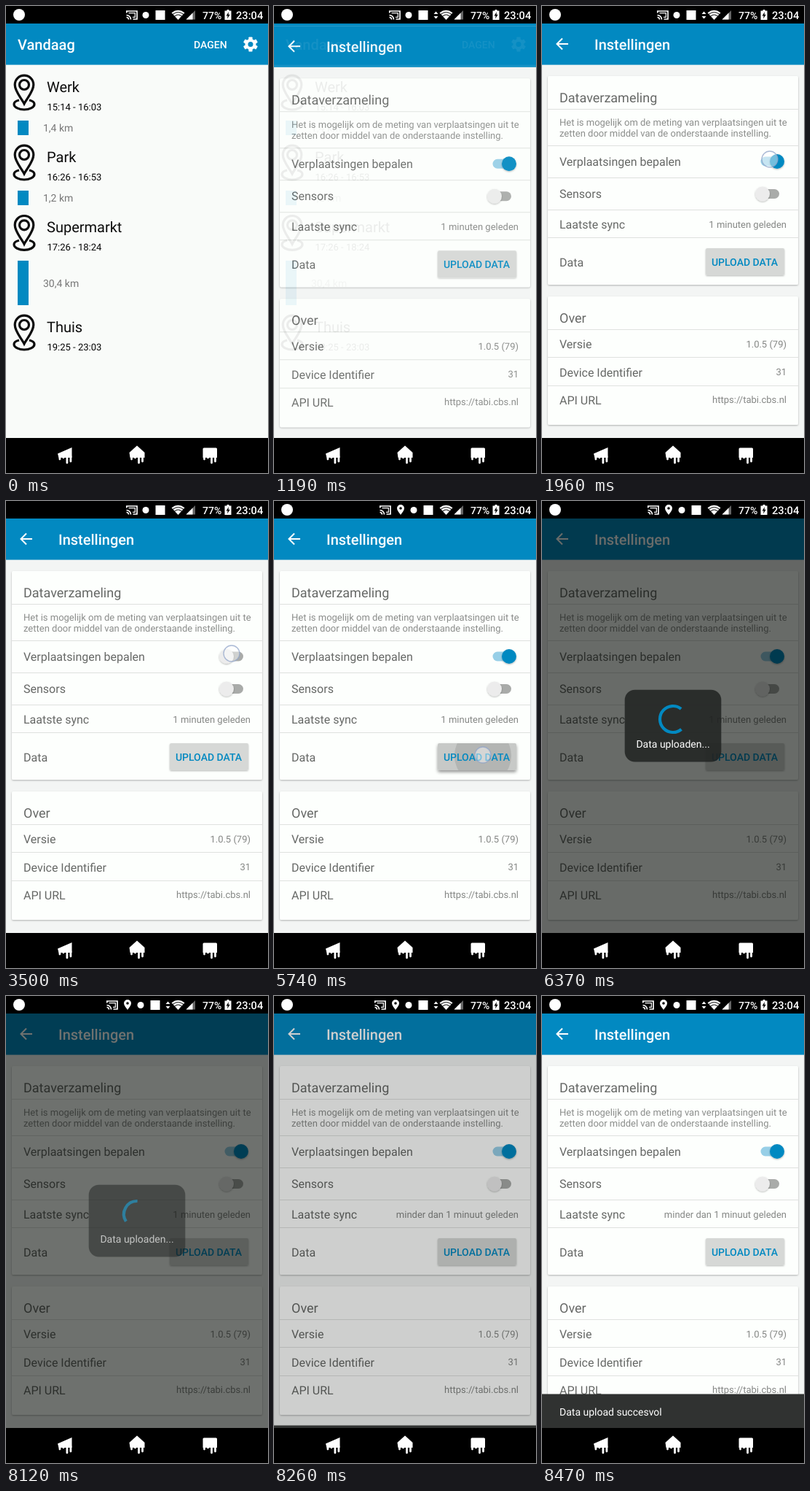
These frames come from a looping animation (360x640 px, 8540 ms). An HTML page:

```html
<!DOCTYPE html>
<html lang="nl">
<head>
<meta charset="utf-8">
<title>Vandaag</title>
<style>
html, body { margin: 0; width: 100%; height: 100%; overflow: hidden; background: #000; }
svg { display: block; width: 360px; height: 640px; font-family: Roboto, "Open Sans", sans-serif; text-rendering: geometricPrecision; }
.medium { font-weight: 500; }
</style>
</head>
<body>
<svg id="stage" viewBox="0 0 360 640" xmlns="http://www.w3.org/2000/svg"></svg>
<script>
const BLUE = '#0289c1';
const LOOP = 8540, STEP = 70;
const stage = document.getElementById('stage');

const text = (x, y, size, fill, str, extra = '') =>
  `<text x="${x}" y="${y}" font-size="${size}" fill="${fill}" ${extra}>${str}</text>`;
const rect = (x, y, w, h, fill, extra = '') =>
  `<rect x="${x}" y="${y}" width="${w}" height="${h}" fill="${fill}" ${extra}/>`;
const circle = (x, y, r, fill, extra = '') =>
  `<circle cx="${x}" cy="${y}" r="${r}" fill="${fill}" ${extra}/>`;
const MEDIUM = 'class="medium"', END = 'text-anchor="end"', MID = 'text-anchor="middle"';

// Overview page
const place = (y, name, hours) => `
  <g transform="translate(25 ${y})">
    <g fill="none" stroke="#0b0b0b" stroke-width="3.2">
      <path d="M-7 36C-11.500 37-14 39-14 41.500C-14 46-7 49-0 49S14 46 14 41.500C14 39 11.500 37 7 36"/>
      <path d="M0 41C-4 33-12.800 24-12.800 15A12.800 12.800 0 0 1 12.800 15C12.800 24 4 33 0 41Z"/>
      <circle cy="15" r="6.500"/>
    </g>
  </g>
  ${text(56, y + 24.7, 20, '#0c0c0c', name)}${text(56.5, y + 50, 13, '#050505', hours)}`;
const trip = (y, h, dist) =>
  rect(16, y, 15, h, BLUE) + text(51, y + h / 2 + 5, 14, '#777', dist);
const header = rect(0, 24, 360, 56.6, BLUE);

const gear = `<g transform="translate(336 52.500)" fill="#fff">
  ${[0, 60, 120].map(a => rect(-2.6, -10, 5.2, 20, '#fff', `rx=".8" transform="rotate(${a})"`)).join('')}
  ${circle(0, 0, 7.5, '#fff')}${circle(0, 0, 3.5, BLUE)}</g>`;

const overview = rect(0, 24, 360, 568, '#f9fbf9') + header
  + text(16, 60, 20, '#fff', 'Vandaag', MEDIUM)
  + text(258, 58, 14, '#fff', 'DAGEN', MEDIUM)
  + '<circle id="gearRipple" cx="336" cy="53" fill="#fff"/>' + gear
  + place(93, 'Werk', '15:14 - 16:03') + trip(157, 20, '1,4 km')
  + place(189, 'Park', '16:26 - 16:53') + trip(253, 20, '1,2 km')
  + place(285.3, 'Supermarkt', '17:26 - 18:24') + trip(349, 61, '30,4 km')
  + place(422, 'Thuis', '19:25 - 23:03');

// Settings page
const card = (y, h, lines) =>
  rect(8, y, 344, h, '#fdfffd', 'rx="2" filter="url(#cardShadow)"')
  + lines.map(v => rect(8, v, 344, 1, '#dfe1df')).join('');
const label = (y, str, size = 16) => text(24, y, size, '#666866', str);
const value = (y, str, id = '') => text(336, y, 13, '#858785', str, `${END} ${id}`);
const toggle = (y, id) => `
  <rect id="${id}Track" x="300.500" y="${y - 6.5}" width="25.500" height="13" rx="6.500" fill="#a9aba9"/>
  <circle id="${id}Ripple" cx="303" cy="${y}" r="20" fill="#000" opacity="0"/>
  <circle id="${id}Thumb" cx="303" cy="${y}" r="10" fill="#ececec" filter="url(#thumbShadow)"/>`;

const settings = rect(0, 24, 360, 568, '#f3f5f4') + header
  + '<path d="M36 52H21M28 44.500L20.500 52L28 59.500" fill="none" stroke="#fff" stroke-width="2"/>'
  + text(72, 60, 20, '#fff', 'Instellingen', MEDIUM)
  + card(96, 286, [141, 191, 235, 279, 317])
  + label(132, 'Dataverzameling', 18)
  + text(24, 164, 13, '#8b8d8b', 'Het is mogelijk om de meting van verplaatsingen uit te')
  + text(24, 178.5, 13, '#8b8d8b', 'zetten door middel van de onderstaande instelling.')
  + label(219, 'Verplaatsingen bepalen') + toggle(213, 'move')
  + label(263, 'Sensors') + toggle(257.5, 'sensor')
  + label(305, 'Laatste sync') + value(303.5, '', 'id="sync"')
  + label(357, 'Data')
  + rect(225, 332, 108, 37, '#d6d8d6', 'id="button" rx="2" filter="url(#cardShadow)"')
  + '<g clip-path="url(#buttonClip)"><rect id="buttonTint" x="225" y="332" width="108" height="37"/>'
  + '<circle id="buttonRipple" cx="287" cy="349"/></g>'
  + text(278.5, 356, 14, BLUE, 'UPLOAD DATA', `${MEDIUM} ${MID}`)
  + card(398, 176, [443, 481, 520])
  + label(434, 'Over', 18)
  + label(469, 'Versie') + value(467.5, '1.0.5 (79)')
  + label(507.5, 'Device Identifier') + value(506, '31')
  + label(546, 'API URL') + value(544, 'https://tabi.cbs.nl');

// System bars
const status = rect(0, 0, 360, 24, '#000')
  + circle(18, 12, 8, '#fff', 'id="notice"')
  + `<g id="cast" fill="none" stroke="#fff" stroke-width="1.700">
      <path d="M165.800 9.500V7H180V18H174.500M165.500 12.500A6 6 0 0 1 171.500 18.500M165.500 15.500A3 3 0 0 1 168.500 18.500"/>
      <path d="M168.500 9.700H177.300V15.300H174" stroke-width="1.200"/></g>`
  + `<path id="pin" fill="#fff" fill-rule="evenodd" d="M174 19C172 16 169 13 169 10A5 5 0 0 1 179 10C179 13 176 16 174 19ZM174 8.200A1.800 1.800 0 1 0 174 11.800A1.800 1.800 0 1 0 174 8.200Z"/>`
  + `<g id="radios">${circle(192, 12.5, 4.5, '#fff')}${rect(205.5, 6, 13, 13, '#fff')}</g>`
  + '<path id="arrows" fill="#fff" d="M219.500 11L222.500 7.500L225.500 11ZM219.500 14L222.500 17.500L225.500 14Z"/>'
  + '<path fill="#fff" d="M236.500 19L227.500 9.200Q236.500 2.500 245.500 9.200Z"/>'
  + '<path fill="none" stroke="#000" stroke-width="1" d="M229 11.500Q236.500 5.500 244 11.500M231.500 14Q236.500 10 241.500 14"/>'
  + '<path fill="#666" d="M247.500 18.500H260V6Z"/><path fill="#fff" d="M247.500 18.500H256.500V9.500Z"/>'
  + text(270, 18, 14, '#fff', '77%', MEDIUM)
  + '<path fill="#fff" d="M303.500 5H306.500V6.500H309.500V19H300.500V6.500H303.500Z"/>'
  + '<path d="M306 8L302.500 13.500H304.700L304 17.500L307.800 11.800H305.500Z"/>'
  + text(316, 18, 14.7, '#fff', '23:04', MEDIUM);

// Each navigation key is a flat body with four drips below it
const drips = x => [3, 1, 8, 6].map((len, i) =>
  `<path d="M${x + i * 5} 617v${len + 1}" stroke="#fff" stroke-width="2.800" stroke-linecap="round"/>`).join('');
const navBar = rect(0, 592, 360, 48, '#000') + `<g fill="#fff">
  <path d="M71 613.500L90.500 605V619H72.500Z"/>${drips(73.9)}
  <path d="M169.500 612L180 602.500L190.500 612V619H170.500Z"/>${drips(172.5)}
  <path d="M270.500 607Q270.500 605.500 272 605.500H288.500Q290 605.500 290 607V619H270.500Z"/>${drips(272.5)}</g>`;

stage.innerHTML = `<defs>
  <filter id="cardShadow" x="-10%" y="-20%" width="120%" height="150%">
    <feDropShadow dx="0" dy="1" stdDeviation="1" flood-opacity=".28"/></filter>
  <filter id="raised" x="-10%" y="-20%" width="120%" height="160%">
    <feDropShadow dx="0" dy="2.500" stdDeviation="2" flood-opacity=".42"/></filter>
  <filter id="thumbShadow" x="-30%" y="-30%" width="160%" height="160%">
    <feDropShadow dx="0" dy="1" stdDeviation=".9" flood-opacity=".3"/></filter>
  <clipPath id="content"><rect y="24" width="360" height="568"/></clipPath>
  <clipPath id="buttonClip"><rect x="225" y="332" width="108" height="37" rx="2"/></clipPath>
</defs>
${rect(0, 0, 360, 640, '#000')}
<g clip-path="url(#content)">
  ${overview}
  <g id="settings">${settings}</g>
  ${rect(0, 24, 360, 568, '#000500', 'id="dim"')}
  <g id="dialog">${rect(113.7, 258.7, 132.6, 98.8, '#222423', 'rx="14" opacity=".87"')}
    <path id="spinner" fill="none" stroke="${BLUE}" stroke-width="4.200"/>
    ${text(180, 338, 14, '#fff', 'Data uploaden...', MID)}</g>
  <g id="snackbar">${rect(0, 545.5, 360, 47, '#303231')}${text(24, 575, 14, '#fff', 'Data upload succesvol')}</g>
</g>
${status}${navBar}
<circle id="touch" r="11" fill="#fff" fill-opacity=".45" stroke="#8fa3c8" stroke-opacity=".75" stroke-width="1.300"/>`;

const el = {};
stage.querySelectorAll('[id]').forEach(node => el[node.id] = node);
const set = (id, attrs) => {
  for (const key in attrs) el[id].setAttribute(key, attrs[key]);
};
const show = (id, on) => set(id, { visibility: on ? 'visible' : 'hidden' });
const shift = (id, x, y = 0) => set(id, { transform: `translate(${x} ${y})` });

const ramp = (t, from, to) => Math.min(1, Math.max(0, (t - from) / (to - from)));
const within = (t, from, to) => t >= from && t < to;

// Solves cubic-bezier(.4, 0, .2, 1)
function ease(x) {
  let lo = 0, hi = 1, u = .5;
  for (let i = 0; i < 20; i++) {
    u = (lo + hi) / 2;
    const bx = 1.2 * u * (1 - u) ** 2 + .6 * u * u * (1 - u) + u ** 3;
    if (bx < x) lo = u; else hi = u;
  }
  return u * u * (3 - 2 * u);
}

const touches = [
  { from: 700, to: 900, x: 336, y: 53 },
  { from: 1870, to: 2020, x: 313, y: 210 },
  { from: 3430, to: 3650, x: 310, y: 209 },
  { from: 5390, to: 5800, x: 287, y: 348 }
];
const pulse = (t, from, full, hold, end) => ramp(t, from, full) * (1 - ramp(t, hold, end));

const DIALOG_START = 5877;
function spinnerPath(time) {
  const cycle = 1333, radius = 18, phase = time % cycle / cycle;
  const base = 27 + time / 4444 * 720 + phase * 90;
  const tail = base + 270 * ease(ramp(phase, .5, 1));
  const head = Math.max(base + 270 * ease(ramp(phase, 0, .5)), tail + 2);
  const point = deg => {
    const a = (deg - 90) * Math.PI / 180;
    return `${180 + radius * Math.cos(a)} ${299 + radius * Math.sin(a)}`;
  };
  return `M${point(tail)}A${radius} ${radius} 0 ${head - tail > 180 ? 1 : 0} 1 ${point(head)}`;
}

function mix(a, b, k) {
  return `rgb(${a.map((v, i) => Math.round(v + (b[i] - v) * k))})`;
}

function render(t) {
  const touch = touches.find(p => within(t, p.from, p.to));
  show('touch', touch);
  if (touch) set('touch', { cx: touch.x, cy: touch.y });

  // Status bar
  const arrows = within(t, 500, 3000) || t >= 6800;
  const pin = t >= 4480;
  const left = arrows ? -7 : 0;
  show('arrows', arrows);
  show('pin', pin);
  shift('pin', left);
  shift('radios', left);
  shift('cast', left - (pin ? 20 : 0));
  set('notice', { r: 8 * (1 - ramp(t, 2900, 3080) + ramp(t, 4450, 4680)) });

  // Page change
  set('gearRipple', { r: 20 * ease(ramp(t, 760, 960)), opacity: .2 * pulse(t, 760, 830, 930, 1100) });
  const opened = ease(ramp(t, 1000, 1280));
  shift('settings', 0, 45 * (1 - opened));
  set('settings', { opacity: opened });

  // Switch
  const on = 1 - ease(ramp(t, 2010, 2230)) + ease(ramp(t, 3660, 3880));
  const thumbX = 303 + 20 * on;
  set('moveTrack', { fill: mix([169, 171, 169], [151, 207, 231], on) });
  set('moveThumb', { cx: thumbX, fill: mix([236, 236, 236], [2, 137, 193], on) });
  set('moveRipple', {
    cx: thumbX,
    opacity: .1 * (pulse(t, 1960, 2080, 2180, 2400) + pulse(t, 3560, 3720, 3820, 4050))
  });

  // Upload button
  const pressed = within(t, 5440, 6000);
  set('button', { filter: `url(#${pressed ? 'raised' : 'cardShadow'})` });
  const press = pulse(t, 5440, 5560, 5800, 6000);
  set('buttonTint', { opacity: .07 * press });
  set('buttonRipple', { r: 8 + 60 * ramp(t, 5460, 6000), opacity: .1 * press });
  el.sync.textContent = t >= 8180 ? 'minder dan 1 minuut geleden' : '1 minuten geleden';

  // Progress dialog and confirmation
  const fadeIn = ramp(t, DIALOG_START, 6080);
  set('dim', { opacity: .59 * fadeIn * (1 - ramp(t, 8110, 8330)) });
  set('dialog', { opacity: fadeIn * (1 - ramp(t, 8050, 8220)) });
  set('spinner', { d: spinnerPath(Math.max(0, t - DIALOG_START)) });
  shift('snackbar', 0, 47 * (1 - ease(ramp(t, 8220, 8460))));
}

const start = performance.now();
function tick() {
  const t = (performance.now() - start) % LOOP;
  render(Math.floor(t / STEP) * STEP);
  requestAnimationFrame(tick);
}
tick();
</script>
</body>
</html>
```
